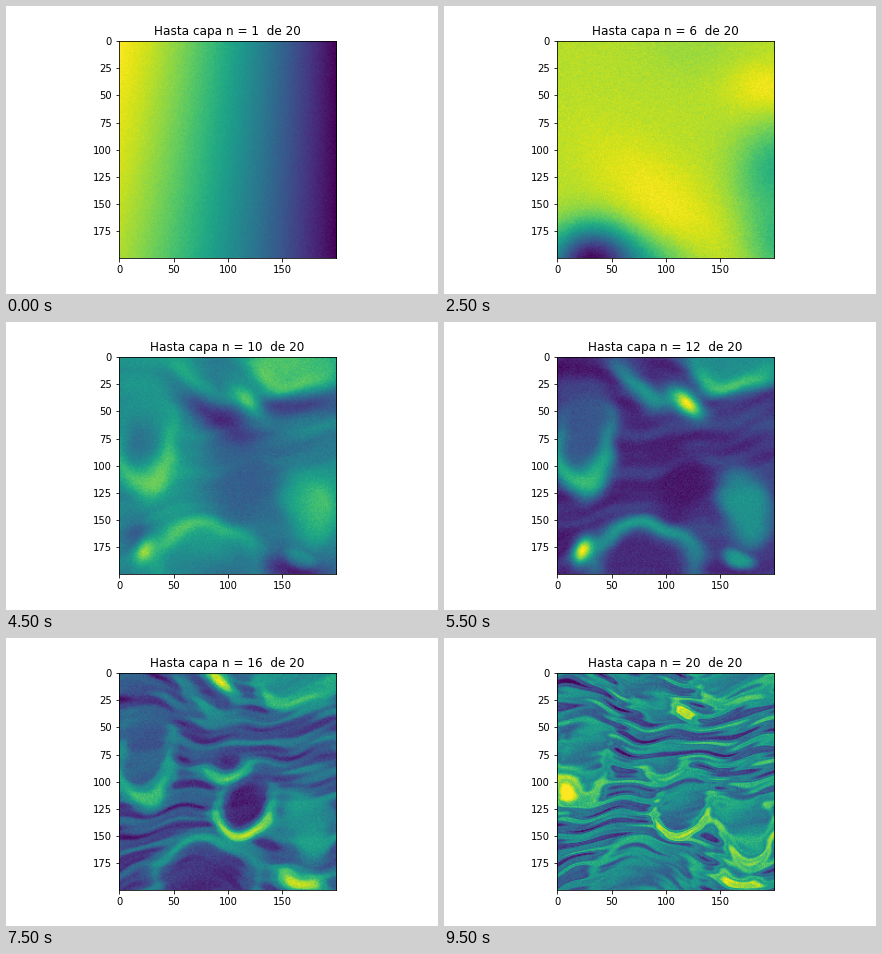
Recreate the animation shown at these times as a matplotlib script. Size 432 by 288 pixels, loop 10 s.

```python
import numpy as np
import matplotlib.pyplot as plt
from matplotlib.animation import FuncAnimation

SIZE, LAYERS = 200, 20
Y, X = np.mgrid[0:SIZE, 0:SIZE].astype(float)

# Swirls of the deep layers: x, y, rx, ry, angle, core, rim, layer where the rim starts.
# The rim is lit on the lower side; a negative ry lights the upper side.
SWIRLS = [
    (80, 192, 48, -38, 0, 0.12, 0.55, 8),
    (24, 72, 25, 42, 0, 0.3, 0.68, 8),
    (172, 138, 24, 36, -8, 0.58, 0.85, 16),
    (162, 4, 36, 24, 0, 0.55, 0.72, 8),
    (85, 22, 26, 13, 38, 0.12, 0.52, 8),
    (116, 121, 27, 27, 0, 0.05, 0.92, 12),
    (98, 85, 17, 10, 0, 0.08, 0.75, 12),
    (168, 187, 17, 9, 8, 0.6, 0.95, 12),
]
# Bright spots: layer, x, y, rx, ry, angle.
SPARKS = [
    (12, 119, 43, 17, 9, 40),
    (12, 23, 178, 8, 13, 25),
    (16, 92, 8, 19, 7, 40),
    (20, 8, 108, 14, 18, 0),
    (20, 116, 36, 14, 6, 40),
]


def local(cx, cy, rx, ry, deg=0, x=X, y=Y):
    """Coordinates in which the given ellipse is the unit circle."""
    c, s = np.cos(np.radians(deg)), np.sin(np.radians(deg))
    dx, dy = x - cx, y - cy
    return (dx * c + dy * s) / rx, (dy * c - dx * s) / ry


def mix(v, weight, value):
    return v + (value - v) * weight


def paint(v, *blobs):
    """Blend soft ellipses (value, x, y, rx, ry, angle) into v."""
    for value, *ellipse in blobs:
        v = mix(v, np.exp(-np.hypot(*local(*ellipse)) ** 2), value)
    return v


def bands():
    s = (X + 0.2 * Y * (1 - X / SIZE)) / SIZE
    return 0.5 * (np.cos(np.pi / 2 * s) + 1 - s)


def slope():
    d = np.hypot(X - 52, Y - 203) * (0.8 + 0.5 * X / SIZE)
    return 1 - np.exp(-(d / 120) ** 1.5)


def plateau():
    ridge = np.exp(-((Y - 0.6 * X - 90) / 45) ** 2) * np.exp(-((X - 95) / 65) ** 2)
    return paint(0.89 + 0.09 * ridge,
                 (0.85, 125, 8, 50, 28),
                 (0.99, 192, 45, 34, 24),
                 (0.62, 204, 120, 38, 42),
                 (0.65, 208, 180, 34, 45),
                 (0.6, 60, 208, 55, 26),
                 (0, 32, 205, 36, 33))


def hills():
    return paint(0.78 - 0.24 / (1 + np.exp((75 - X) / 8)),
                 (0.98, 18, 0, 42, 30),
                 (0.96, 47, 110, 26, 48, 8),
                 (0.48, 17, 78, 22, 24),
                 (0.97, 148, 6, 58, 28, -6),
                 (0.2, 155, 46, 55, 9, -4),
                 (0.74, 172, 68, 35, 7, -15),
                 (0.05, 92, 55, 36, 14, 36),
                 (0.95, 194, 130, 32, 42),
                 (0.97, 75, 168, 44, 20, 18),
                 (0.45, 17, 163, 14, 15),
                 (0.03, 162, 197, 34, 13, 17))


def swirls(n):
    """Deep layers: streams around shared swirls, finer and brighter with n."""
    t = (n - 16) / 4
    late = max(t, 0)
    x = X + 2.5 * (np.sin(Y / 13 + X / 31) + 0.5 * np.sin(Y / 6 - X / 11))
    y = Y + 2.5 * (np.sin(X / 12 - Y / 37) + 0.5 * np.sin(X / 7 + Y / 10))

    sag = 24 * np.sin((x - 60) / 45) * np.clip(1 - y / 110, 0, 1)
    arch = 25 * np.cos((x - 55) / 40) * np.clip((y - 120) / 60, 0, 1)
    stream = (y - sag + arch) * (0.24 + 0.1 * t)
    streaks = np.sin(stream + 1.5 * np.sin(x / 23 + y / 40)) + 0.6 * np.sin(2.3 * stream + x / 15)
    v = 0.22 + 0.12 * t + 0.08 * X / SIZE + (0.1 + 0.06 * t) * streaks

    width = 6.5 - 2 * t
    for cx, cy, rx, ry, deg, core, rim, start in SWIRLS:
        u, w = local(cx, cy, rx, ry, deg, x, y)
        r = np.hypot(u, w) + 1e-6
        v = mix(v, 0.85 * np.exp(-r ** 4), mix(core, 0.8 * late, 0.52))
        edge = np.exp(-((r - 1) * min(rx, abs(ry)) / width) ** 2)
        lit = 0.5 + 0.5 * w / r
        v = mix(v, edge * lit * np.clip((n - start) / 4, 0, 1), rim)

    for layer, *ellipse in SPARKS:
        glow = max(0, 1 - abs(n - layer) / 4)
        v = mix(v, glow * np.exp(-np.hypot(*local(*ellipse)) ** 2), 1)
    return v + (0.03 + 0.03 * t + 0.04 * late) * np.sin(24 * v + y / 7 + x / 16)


EARLY = {1: bands(), 3: slope(), 6: plateau(), 8: hills(), 12: swirls(12)}


def layer_image(n):
    if n > 12:
        v = swirls(n)
    else:
        lo = max(k for k in EARLY if k <= n)
        hi = min(k for k in EARLY if k >= n)
        v = mix(EARLY[lo], (n - lo) / max(hi - lo, 1), EARLY[hi])
    grain = 0.01 + 0.02 * n / LAYERS
    noise = np.random.default_rng(n).normal(0, grain, v.shape)
    return np.clip(v + noise, 0, 1)


fig, ax = plt.subplots(figsize=(6, 4), dpi=72)
fig.subplots_adjust(left=0.125, right=0.9, bottom=0.125, top=0.88)
image = ax.imshow(layer_image(1), cmap="viridis", vmin=0, vmax=1)
ax.set_xticks(range(0, SIZE, 50))
ax.set_yticks(range(0, SIZE, 25))
title = ax.set_title("")


def update(frame):
    n = frame + 1
    image.set_data(layer_image(n))
    title.set_text(f"Hasta capa n = {n}  de {LAYERS}")
    return image, title


anim = FuncAnimation(fig, update, frames=LAYERS, interval=500, repeat=True, repeat_delay=0)
plt.show()
```
